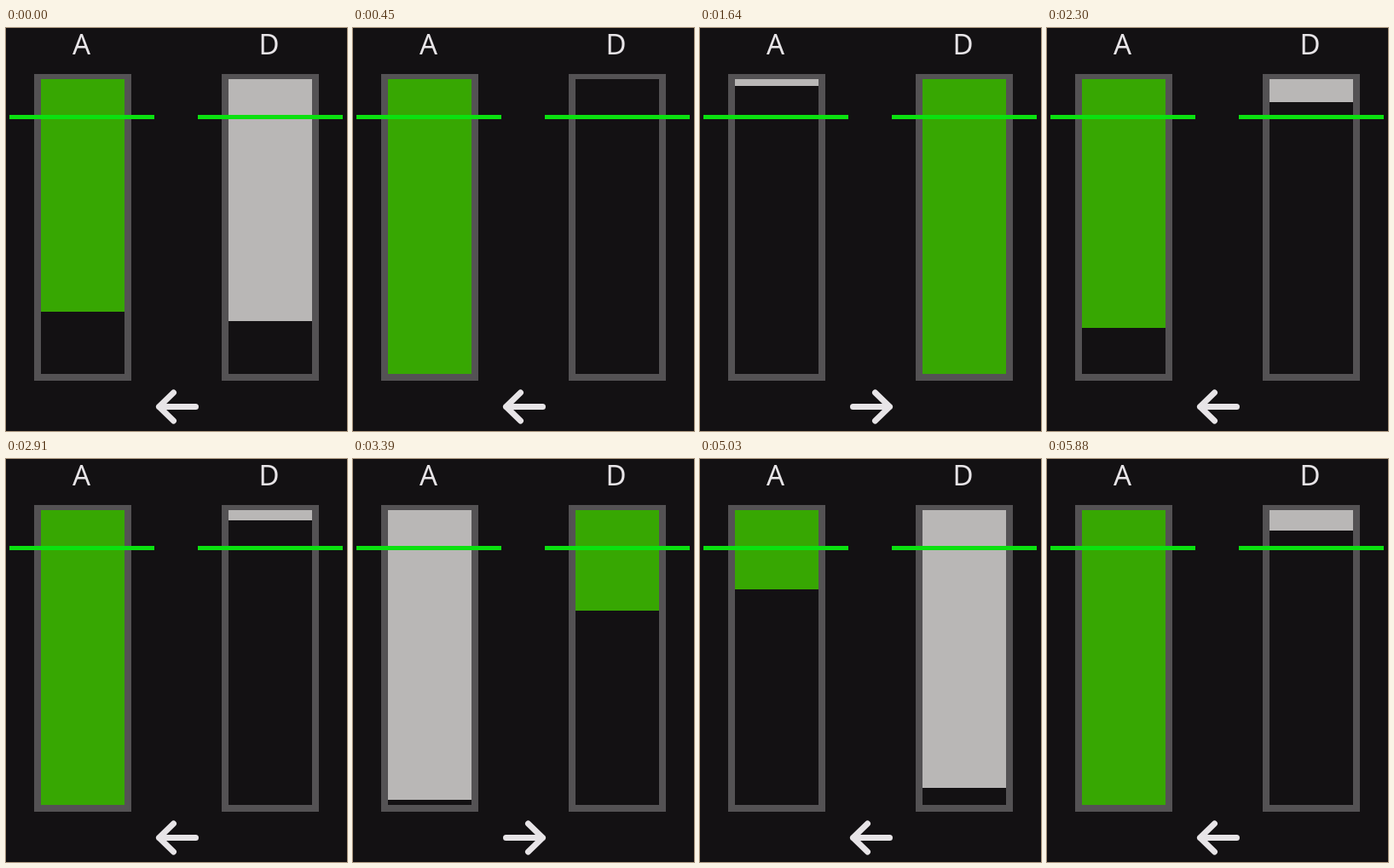
Write an HTML page with a canvas that moves like this. It is 400 by 473 pixels and loops after 5.91 s.

```html
<!DOCTYPE html>
<html lang="en">
<head>
<meta charset="utf-8">
<title>Key travel</title>
<style>
html, body { margin: 0; width: 100%; height: 100%; overflow: hidden; background: #131113; }
canvas { display: block; }
</style>
</head>
<body>
<canvas id="stage" width="400" height="473"></canvas>
<script>
const ctx = document.getElementById('stage').getContext('2d');
const LOOP = 5910, STEP = 30;
const TOP = 60, TRAVEL = 346;

// moves: [start ms, duration ms], alternating press and release
const keys = [
  { name: 'A', x: 33, lineX: 4, pressFirst: true,
    moves: [[-633, 900], [860, 650], [1532, 996], [3311, 1031], [4553, 1343]] },
  { name: 'D', x: 253, lineX: 225, pressFirst: false,
    moves: [[-162, 600], [492, 900], [1782, 600], [2722, 1703], [4826, 1254]] }
];

// moments when the other key takes over; A is active first
const switches = [690, 1755, 3101, 4850];

function ease(u) {
  u = Math.min(1, Math.max(0, u));
  return u * u * (3 - 2 * u);
}

function depth(key, t) {
  let d = key.pressFirst ? 0 : 1;
  key.moves.forEach(([start, span], i) => {
    const press = (i % 2 === 0) === key.pressFirst;
    if (t >= start) {
      const e = ease((t - start) / span);
      d = press ? e : 1 - e;
    }
  });
  return d;
}

function rect(color, x, y, w, h) {
  ctx.fillStyle = color;
  ctx.fillRect(x, y, w, h);
}

function drawKey(key, t, active) {
  rect('#545254', key.x, 54, 114, 360);
  rect('#131113', key.x + 8, TOP, 98, TRAVEL);
  const h = Math.round(depth(key, t) * TRAVEL);
  rect(active ? '#37a702' : '#b9b7b6', key.x + 8, TOP, 98, h);
  rect('#0be110', key.lineX, 102, 170, 5);
  ctx.fillStyle = '#e7e4e7';
  ctx.fillText(key.name, key.x + 55.5, 31);
}

function drawArrow(dir) {
  ctx.save();
  ctx.translate(201, 444.5);
  ctx.scale(dir, 1);
  ctx.beginPath();
  ctx.moveTo(-21.5, 0);
  ctx.lineTo(21.5, 0);
  ctx.moveTo(4.5, -16.5);
  ctx.lineTo(21.5, 0);
  ctx.lineTo(4.5, 16.5);
  ctx.stroke();
  ctx.restore();
}

function draw(now) {
  const t = Math.floor((now % LOOP) / STEP) * STEP;
  const active = switches.filter(s => t >= s).length % 2;
  rect('#131113', 0, 0, 400, 473);
  ctx.font = '33px "Noto Sans", "Open Sans", sans-serif';
  ctx.textAlign = 'center';
  ctx.strokeStyle = '#e7e4e7';
  ctx.lineWidth = 7;
  ctx.lineCap = ctx.lineJoin = 'round';
  keys.forEach((key, i) => drawKey(key, t, i === active));
  drawArrow(active ? 1 : -1);
}

const began = performance.now();
function tick() {
  draw(performance.now() - began);
  requestAnimationFrame(tick);
}
tick();
</script>
</body>
</html>
```
